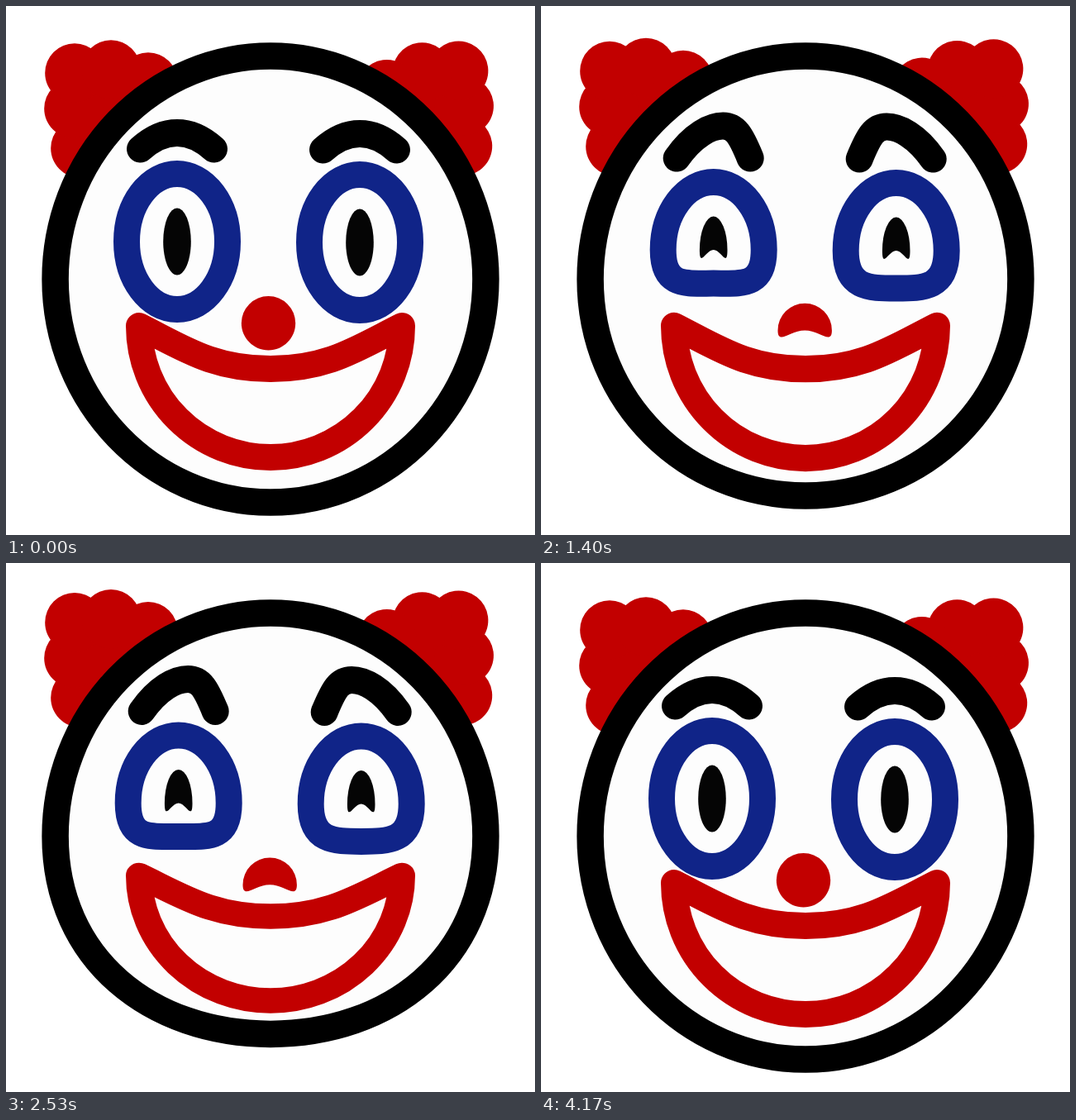
An HTML page with a canvas for the animation above (4.21 s loop, 640x640 px).

```html
<!DOCTYPE html>
<html lang="en">
<head>
<meta charset="utf-8">
<title>Laughing clown</title>
<style>
  html, body { margin: 0; height: 100%; overflow: hidden; background: #fff; }
  canvas { display: block; width: 100vw; height: 100vh; }
</style>
</head>
<body>
<canvas id="stage" width="640" height="640"></canvas>
<script>
const ctx = document.getElementById('stage').getContext('2d');
const LOOP = 4210, RED = '#c20000', BLUE = '#102488', BLACK = '#000', SKIN = '#fdfdfd';

const clamp = v => Math.max(0, Math.min(1, v));
const ease = v => (1 - Math.cos(Math.PI * clamp(v))) / 2;
const wave = (t, start, period) => (1 - Math.cos(2 * Math.PI * (t - start) / period)) / 2;
const bounce = (t, start, end, period) => t > start && t < end ? wave(t, start, period) : 0;

function fill(color) {
  ctx.fillStyle = color;
  ctx.fill();
}

function stroke(color, width = 32) {
  ctx.strokeStyle = color;
  ctx.lineWidth = width;
  ctx.stroke();
}

// Runs a drawing inside its own transform.
function group(x, y, paint) {
  ctx.save();
  ctx.translate(x, y);
  paint();
  ctx.restore();
}

// Ellipse whose lowest point is pushed up while all handles keep their length.
function blob(x, y, rx, ry, push = 0) {
  const hx = rx * .5523, hy = ry * .5523, bottom = y + ry - push;
  ctx.beginPath();
  ctx.ellipse(x, y, rx, ry, 0, Math.PI, 2 * Math.PI);
  ctx.bezierCurveTo(x + rx, y + hy, x + hx, bottom, x, bottom);
  ctx.bezierCurveTo(x - hx, bottom, x - rx, y + hy, x - rx, y);
  ctx.closePath();
}

function drawTuft() {
  const curls = [[90, 172], [82, 124], [83, 81], [127, 77], [172, 92]];
  ctx.beginPath();
  for (const [x, y] of curls) ctx.lineTo(x, y);
  fill(RED);
  for (const [x, y] of curls) {
    blob(x, y, 35.8, 35.8);
    fill(RED);
  }
}

function drawHair(lift) {
  group(0, -lift, drawTuft);
  group(532, 152 - lift, () => {
    ctx.rotate(-.13);
    ctx.translate(108, -152);
    ctx.scale(-1, 1);
    drawTuft();
  });
}

function drawHead(squash) {
  blob(320, 330.5, 260.4, 270, 32 * squash);
  fill(SKIN);
  stroke(BLACK, 32.5);
}

// The brow's peak rises and slides towards the nose (lean is 1 or -1).
function drawBrow(lean, m) {
  const px = lean * 11.5 * m, base = m, peak = -19.5 - 18.5 * m;
  const near = x => x + .35 * (px - x), high = base + .72 * (peak - base);
  ctx.beginPath();
  ctx.moveTo(-44.5, base);
  ctx.bezierCurveTo(near(-44.5), high, px - 15, peak, px, peak);
  ctx.bezierCurveTo(px + 15, peak, near(44.5), high, 44.5, base);
  stroke(BLACK, 33);
}

function drawEye(lean, m) {
  blob(0, 0, 61, 82, (39 + 2.5 * lean) * m);
  stroke(BLUE);
  blob(0, 0, 16.8, 40.5, 40.5 * m);
  fill('#050505');
  group(0, -112, () => drawBrow(lean, m));
}

function drawMouth(lift, scale) {
  group(320, 371 - lift, () => {
    ctx.scale(1, scale);
    ctx.beginPath();
    ctx.arc(0, 16, 159, 0, Math.PI);
    ctx.bezierCurveTo(-105, 43, -70, 68, 0, 68);
    ctx.bezierCurveTo(70, 68, 105, 43, 159, 16);
    ctx.closePath();
    stroke(RED);
  });
}

// t counts thirtieths of a second.
function draw(t) {
  const morph = t < 60 ? ease(t / 10) : 1 - ease((t - 112) / 12.8);
  const squash = bounce(t, 1, 109, 6);
  const hair = t < 25 ? bounce(t, 13, 25, 12) : squash;
  const down = 1 - bounce(t, 7.84, 111.84, 8);
  const lift = (11 + t / 12) * bounce(t, 4.17, 112.2, 6.353);
  const scale = 1 - .05 * squash ** 2 + .16 * squash * (1 - squash) * (1 - t / 66);

  ctx.fillStyle = '#fff';
  ctx.fillRect(0, 0, 640, 640);
  ctx.lineCap = ctx.lineJoin = 'round';
  drawHair(9.5 * hair);
  drawHead(squash);
  group(1.7 * morph, 5.3 * morph, () => {
    group(207, 285 + 11 * down * morph, () => drawEye(1, morph));
    group(428, 286 + 11 * down * morph, () => drawEye(-1, morph));
    blob(317.5, 383.8 + 7.5 * down * morph, 32.7, 32.7, 32.7 * morph);
    fill(RED);
  });
  drawMouth(lift, scale);
}

// 25 drawings per second shown on a 30 Hz clock.
function frame() {
  const tick = Math.floor((performance.now() % LOOP + 5) * .03);
  const step = Math.min(104, tick - Math.floor((tick + 3) / 6));
  draw(step * 1.2);
  requestAnimationFrame(frame);
}
frame();
</script>
</body>
</html>
```
